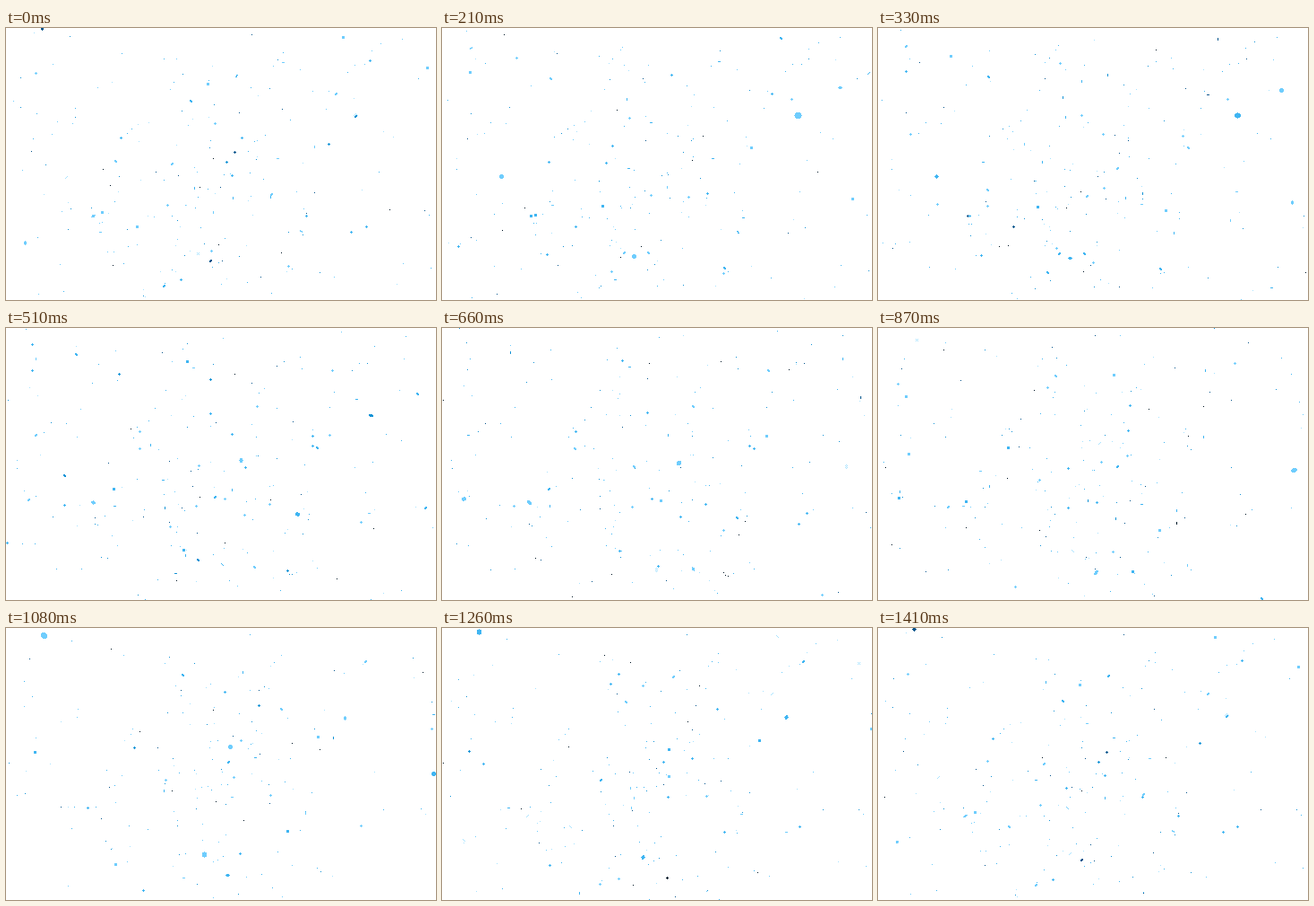
These frames come from a looping animation (480 px wide and 303 px high, 1440 ms). An HTML page with a canvas:

```html
<!DOCTYPE html>
<html lang="en">
<head>
<meta charset="utf-8">
<title>Blue glitter</title>
<style>
html, body { margin: 0; width: 100%; height: 100%; overflow: hidden; background: #fff; }
canvas { display: block; width: 480px; height: 303px; }
</style>
</head>
<body>
<canvas id="stage" width="480" height="303"></canvas>
<script>
const WIDTH = 480, HEIGHT = 303, LOOP = 1440, STEP = 30;
const ctx = document.getElementById('stage').getContext('2d');
const shades = ['#a9e3ff', '#6fcdfd', '#3fb5f2', '#1593d6', '#07558c', '#001524'];

// Large flakes: time of full size, x, y, velocity in px/s, size
const flakes = [
  [210, 397, 97, 33, 0, 8], [1200, 382, 99, 33, -5, 5],
  [330, 450, 69, 50, 24, 5], [0, 470, 44, 30, 28, 4],
  [0, 376, 10, 9, 6, 4], [0, 368, 73, 0, 2, 4],
  [210, 121, 56, 15, -18, 4], [0, 97, 209, 9, 0, 5],
  [0, 146, 221, 15, 0, 4], [660, 24, 190, -6, -5, 5],
  [1140, 350, 122, 32, 22, 4], [210, 66, 165, -5, -4, 5],
  [0, 21, 239, -16, 18, 4], [210, 214, 254, 0, 14, 5],
  [330, 462, 194, 33, 33, 4], [500, 325, 207, 22, 26, 5],
  [660, 264, 150, 14, 19, 6], [660, 97, 194, 3, -3, 6],
  [870, 243, 272, 20, 15, 6], [660, 280, 268, 20, 12, 5],
  [870, 464, 158, 60, 20, 7], [1080, 42, 8, -6, -22, 8],
  [1080, 250, 132, 14, 18, 5], [1080, 221, 252, 19, 19, 6]
].map(([peak, x, y, vx, vy, size], i) =>
  ({ peak, x, y, vx, vy, size, life: 680, angle: i * 1.7, spin: 0.002 }));

function seeded(seed) {
  return () => {
    seed = (seed + 0x6d2b79f5) | 0;
    let n = Math.imul(seed ^ (seed >>> 15), 1 | seed);
    n = (n + Math.imul(n ^ (n >>> 7), 61 | n)) ^ n;
    return ((n ^ (n >>> 14)) >>> 0) / 4294967296;
  };
}

const random = seeded(41);
const between = (low, high) => low + (high - low) * random();
const bell = () => random() + random() + random() - 1.5;

function makeSpeck() {
  const central = random() < 0.42;
  const x = central ? 235 + bell() * 150 : random() * WIDTH;
  const y = central ? 165 + bell() * 170 : random() * HEIGHT;
  return {
    x, y,
    vx: (x - 240) * 0.07 + between(-7, 7),
    vy: (y - 150) * 0.07 + between(-7, 9),
    peak: random() * LOOP,
    size: 0.9 + 2.7 * random() ** 1.8,
    life: between(500, 1350),
    angle: random() * Math.PI,
    spin: between(-0.004, 0.004)
  };
}

const particles = flakes.concat(Array.from({ length: 310 }, makeSpeck));

function drawBlob(cx, cy, size, angle, flatness, shade) {
  ctx.fillStyle = shades[shade];
  cx = Math.round(cx);
  cy = Math.round(cy);
  if (size < 1.6) {
    ctx.fillRect(cx, cy, 1, 1);
    return;
  }
  const radius = size / 2, reach = Math.ceil(radius);
  const c = Math.cos(angle), s = Math.sin(angle);
  for (let y = -reach; y <= reach; y++) {
    for (let x = -reach; x <= reach; x++) {
      const u = (x * c + y * s) / radius;
      const v = (y * c - x * s) / (radius * flatness);
      const gap = shade === 0 && (x + y) & 1;
      if (u * u + v * v <= 1.05 && !gap) ctx.fillRect(cx + x, cy + y, 1, 1);
    }
  }
}

function drawParticle(p, time) {
  // Each particle lives once per loop, wrapping over the seam.
  const birth = p.peak - p.life * 0.42;
  const age = ((time - birth) % LOOP + LOOP) % LOOP;
  if (age > p.life) return;
  const progress = age / p.life;
  const elapsed = age - p.life * 0.42;
  const growth = progress < 0.42
    ? 0.55 + 0.45 * progress / 0.42
    : 1 - 0.55 * (progress - 0.42) / 0.58;
  const shade = progress < 0.16 ? 0 : progress < 0.42 ? 1 : progress < 0.73 ? 2
    : progress < 0.88 ? 3 : progress < 0.95 ? 4 : 5;
  const angle = p.angle + p.spin * elapsed;
  const flatness = 0.5 + 0.45 * Math.abs(Math.cos(angle * 2));
  drawBlob(p.x + p.vx * elapsed / 1000, p.y + p.vy * elapsed / 1000,
    p.size * growth, angle, flatness, shade);
}

function render(now) {
  const time = Math.floor((now % LOOP) / STEP) * STEP;
  ctx.fillStyle = '#fff';
  ctx.fillRect(0, 0, WIDTH, HEIGHT);
  for (const p of particles) drawParticle(p, time);
}

const start = performance.now();
function tick() {
  render(performance.now() - start);
  requestAnimationFrame(tick);
}
tick();
</script>
</body>
</html>
```
